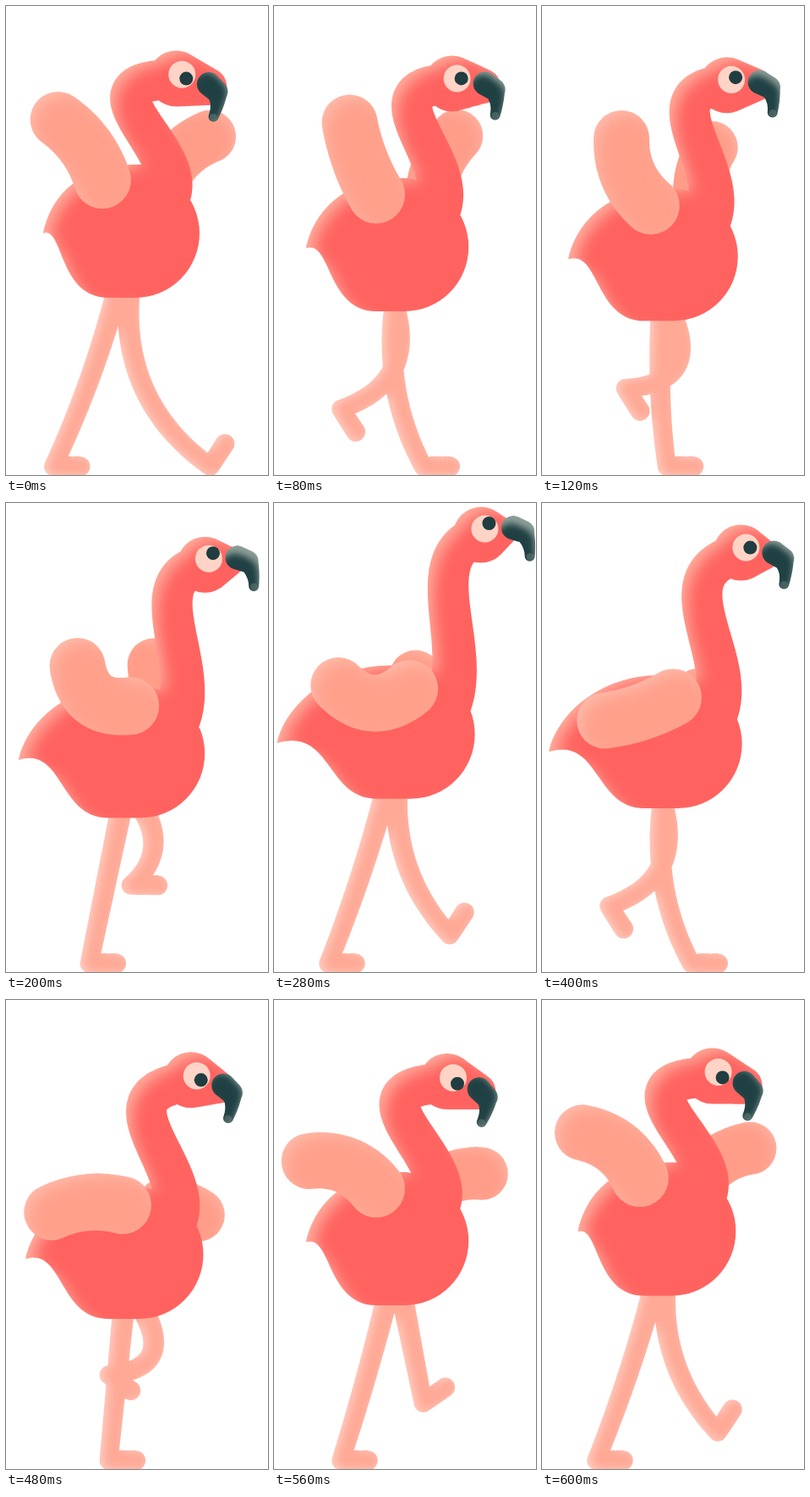
Write an HTML page with a canvas that moves like this. It is 310 by 553 pixels and loops after 640 ms.

```html
<!DOCTYPE html>
<html lang="en">
<head>
<meta charset="utf-8">
<title>Strutting flamingo</title>
<style>
  html, body { margin: 0; width: 310px; height: 553px; overflow: hidden; background: #fff; }
  canvas { display: block; }
</style>
</head>
<body>
<canvas id="stage" width="310" height="553"></canvas>
<script>
const W = 310, H = 553, STEPS = 16, STEP_MS = 40, GROUND = 543;
const ctx = document.getElementById('stage').getContext('2d');
const layer = document.createElement('canvas');
layer.width = W;
layer.height = H;
const ink = layer.getContext('2d');

const mix = (a, b, w) => a + (b - a) * w;
const clamp = v => Math.max(0, Math.min(1, v));

// Cosine over the loop, highest at the given step, repeated beat times.
const wave = (t, peak, beat = 1) => Math.cos((t - peak) * beat * 2 * Math.PI / STEPS);

// Point [x, y, radius] on a Bezier curve of any degree.
function bezier(pts, u) {
  while (pts.length > 1) {
    pts = pts.slice(1).map((q, i) => q.map((v, c) => mix(pts[i][c], v, u)));
  }
  return pts[0];
}

function addDisc(path, x, y, r) {
  path.moveTo(x + r, y);
  path.arc(x, y, r, 0, 2 * Math.PI);
}

function addTube(path, pts) {
  for (let i = 0; i <= 60; i++) addDisc(path, ...bezier(pts, i / 60));
}

// Tube from a to b whose middle is pushed sideways by bend.
function addArch(path, a, b, bend) {
  const dx = b[0] - a[0], dy = b[1] - a[1], k = 2 * bend / Math.hypot(dx, dy);
  addTube(path, [a, [(a[0] + b[0]) / 2 + dy * k, (a[1] + b[1]) / 2 - dx * k, (a[2] + b[2]) / 2], b]);
}

// Fills a shape with a soft light rim on the side away from (dx, dy).
function shade(path, light, base, dx, dy, blur, passes = 2) {
  ink.clearRect(0, 0, W, H);
  ink.fillStyle = light;
  ink.fill(path);
  ink.save();
  ink.globalCompositeOperation = 'source-atop';
  ink.shadowColor = ink.fillStyle = base;
  ink.shadowBlur = blur;
  ink.shadowOffsetX = 1000 + dx;
  ink.shadowOffsetY = dy;
  ink.translate(-1000, 0);
  for (let i = 0; i < passes; i++) ink.fill(path);
  ink.restore();
  ctx.drawImage(layer, 0, 0);
}

function disc(x, y, r, color) {
  ctx.fillStyle = color;
  ctx.beginPath();
  ctx.arc(x, y, r, 0, 2 * Math.PI);
  ctx.fill();
}

// Steps 0 to 8 swing the leg forward, 8 to 16 carry it back on the ground.
function addLeg(path, k, base) {
  const swing = Math.sin(Math.PI * Math.min(k, 8) / 8);
  const lift = 101 * Math.max(0, swing) ** 1.15;
  const reach = Math.min(k, STEPS - k);
  const hipPush = k < 7 ? 24 * Math.sin(Math.PI * (k / 7) ** 1.4) ** 2 : 0;
  const bend = 38 * Math.sin(Math.PI * k / 6) * clamp((12 - k) / 4);
  const tilt = k < 10 ? Math.PI / 3 * Math.sin(Math.PI * k / 5) : 0;

  const hip = [139 - 7 * wave(k, 0) + hipPush, base - 10, 13];
  const ankle = [56 + 8.2 * reach ** 1.5, GROUND - lift, 11];
  const toe = [ankle[0] + 32 * Math.cos(tilt), ankle[1] + 32 * Math.sin(tilt), 11.5];
  addArch(path, hip, ankle, bend + 5 * clamp(1 - reach / 3));
  addTube(path, [ankle, toe]);
}

function drawLegs(t, base) {
  const path = new Path2D();
  addLeg(path, t, base);
  addLeg(path, (t + 8) % STEPS, base);
  shade(path, '#ffcfc3', '#ffa996', 4, 0, 12, 1);
}

function drawBackWing(t, base) {
  const path = new Path2D();
  const tip = [207 + 40 * wave(t, 14.6), base - 159 - 48 * wave(t, 2.2), 31];
  addArch(path, tip, [185, base - 135, 30], -4 - 4 * wave(t, 0));
  shade(path, '#ffb6a6', '#ff9d89', -6, 5, 18);
}

function drawFrontWing(t, base) {
  const path = new Path2D();
  const tip = [71 + 20 * wave(t, 5) + 11 * wave(t, 2.2, 2), base - 163 - 60 * wave(t, 1.7), 33];
  const root = [138 + 24 * wave(t, 8), base - 134 - 5 * wave(t, 0), 34];
  addArch(path, tip, root, 16 * wave(t, 14) - 4);
  shade(path, '#ffc0b1', '#ffa08b', 8, 8, 24);
}

// Tail, back and belly; crouch runs from 1 (low) to -1 (stretched).
function addTorso(path, crouch, base) {
  const tipX = 23 + 21 * crouch, tipY = base - 70.5 - 5.5 * crouch;
  const belly = 157.5 - 4.5 * crouch;
  path.moveTo(tipX, tipY);
  path.bezierCurveTo(tipX + 10, tipY - 47, 80 + 10 * crouch, base - 159, 150 + 10 * crouch, base - 157);
  path.lineTo(190, base - 150);
  path.lineTo(belly, base);
  path.lineTo(121, base);
  path.bezierCurveTo(62, base, 68, base - 85, tipX, tipY);
  addDisc(path, belly, base - 76, 76);
}

function drawBody(t, base) {
  const rise = wave(t, -.4), nod = wave(t, -2);
  const eye = [229 - 21 * rise, base - 291 + 28 * rise];
  const a = nod * 13.5 * Math.PI / 180, cos = Math.cos(a), sin = Math.sin(a);
  const turn = (x, y, r) => [eye[0] + x * cos - y * sin, eye[1] + x * sin + y * cos, r];
  // Neck joint between its crouched and stretched places.
  const joint = (peak, ax, ay, bx, by, r) => {
    const w = (1 - wave(t, peak)) / 2;
    return [mix(ax, bx, w), base + mix(ay, by, w), r];
  };

  const body = new Path2D();
  addTorso(body, wave(t, 0), base);
  addTube(body, [
    joint(0, 184, -110, 206, -110, 28),
    joint(-.6, 235, -165, 236, -180, 25),
    joint(-1, 58, -258, 166, -287, 23.5),
    [eye[0] - 3, eye[1] + 6, 24]
  ]);
  addTube(body, [turn(-6, 6, 33), turn(28 + 5 * rise, 9, 18 + 4 * rise)]);
  shade(body, '#ffb09f', '#ff625f', 12, 9, 22);

  disc(eye[0], eye[1], 16, '#ffd4c6');
  disc(eye[0] + 5, eye[1] + 7 * nod, 8, '#203d41');

  const beak = new Path2D();
  addTube(beak, [turn(33, 6, 14), turn(44, 13, 13)]);
  addTube(beak, [turn(44, 13, 12.5), turn(49, 27, 7), turn(45, 43, 6)]);
  shade(beak, '#8a9c96', '#1f4043', -3, 6 - 6 * nod, 10);
  disc(...turn(45, 44, 4.5), 'rgba(120,140,136,.4)');
}

function draw(t) {
  const base = 360 - 16 * wave(t, 0, 2);
  ctx.fillStyle = '#fff';
  ctx.fillRect(0, 0, W, H);
  drawLegs(t, base);
  drawBackWing(t, base);
  drawBody(t, base);
  drawFrontWing(t, base);
}

let shown = -1;
function tick() {
  const step = Math.floor(performance.now() / STEP_MS) % STEPS;
  if (step !== shown) draw(shown = step);
  requestAnimationFrame(tick);
}
tick();
</script>
</body>
</html>
```
